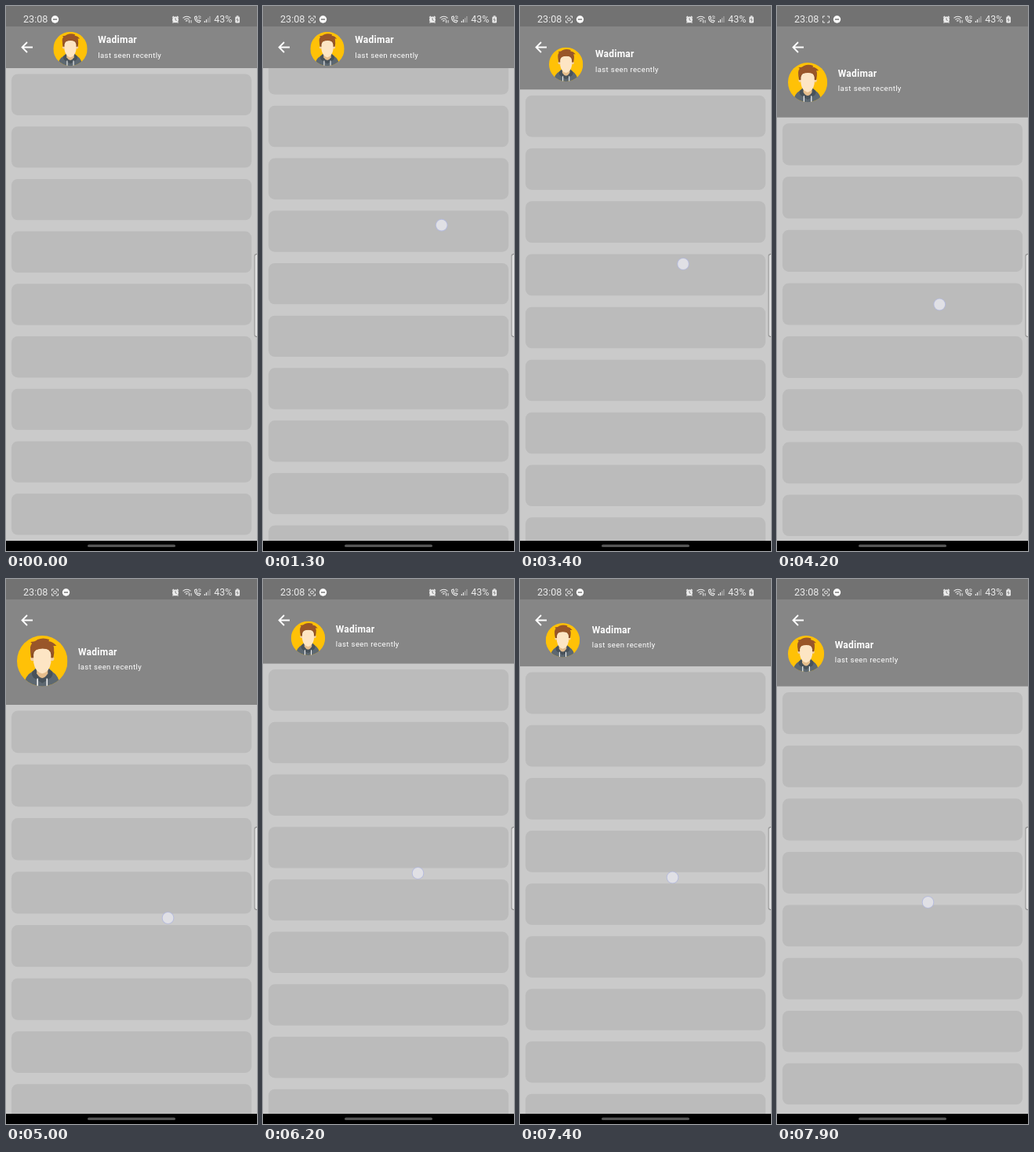
Animation of 320 by 693 pixels, one loop 8 s. Source, as an HTML page with a canvas:

```html
<!DOCTYPE html>
<html lang="en">
<head>
<meta charset="utf-8">
<title>Collapsing profile header</title>
<style>
html, body { margin: 0; width: 100%; height: 100%; overflow: hidden; background: #000; }
canvas { display: block; width: 320px; height: 693px; }
</style>
</head>
<body>
<canvas id="stage"></canvas>
<script>
const W = 320, H = 693, LOOP = 8000, STEP = 100;
const BAR = 79, EXPAND = 54, ROW = 66.7, ROW_H = 52.4, LIST_END = 680;
const FONT = 'Roboto, "Noto Sans", sans-serif';

const canvas = document.getElementById('stage');
const ratio = window.devicePixelRatio || 1;
canvas.width = W * ratio;
canvas.height = H * ratio;
const c = canvas.getContext('2d');
c.scale(ratio, ratio);

// time, finger x, finger y
const FINGER = [
  [1100, 228, 305], [1700, 227, 226], [2200, 225, 256], [3400, 208, 328],
  [5000, 206.5, 431], [5450, 205, 434], [5850, 204, 434],
  [6200, 197.5, 374], [6550, 197, 328], [6900, 196.5, 348], [7900, 192.5, 411]
];
// time, pull: below zero the list is scrolled, above zero the header grows
const PULL = [
  [1100, 0], [1700, -79], [2200, -48.7], [3400, 27.2], [3820, 54], [5000, 81],
  [5450, 82], [5850, 82], [6200, 28.6], [6550, -19], [6900, 0.8],
  [7750, 54], [7900, 57.5]
];
const STRETCH = [[2970, 0], [3400, 3], [5000, 8], [5850, 8], [6050, 0], [6900, 0], [7900, 5]];

function at(keys, t, col = 1) {
  if (t <= keys[0][0]) return keys[0][col];
  for (let i = 1; i < keys.length; i++) {
    const a = keys[i - 1], b = keys[i];
    if (t <= b[0]) return a[col] + (b[col] - a[col]) * (t - a[0]) / (b[0] - a[0]);
  }
  return keys[keys.length - 1][col];
}

function rect(x, y, w, h, color) {
  c.fillStyle = color;
  c.fillRect(x, y, w, h);
}

function pill(x, y, w, h, r, color) {
  c.beginPath();
  c.roundRect(x, y, w, h, r);
  c.fillStyle = color;
  c.fill();
}

function disc(x, y, r, color) {
  c.beginPath();
  c.arc(x, y, r, 0, Math.PI * 2);
  c.fillStyle = color;
  c.fill();
}

function line(path, width, color = '#fff') {
  c.strokeStyle = color;
  c.lineWidth = width;
  c.stroke(new Path2D(path));
}

function shape(path, color) {
  c.fillStyle = color;
  c.fill(new Path2D(path));
}

function label(text, x, y, font, spacing, color = '#fff') {
  c.font = font + ' ' + FONT;
  c.letterSpacing = spacing + 'px';
  c.fillStyle = color;
  c.fillText(text, x, y);
}

function drawList(pull, stretch) {
  rect(0, BAR, W, LIST_END - BAR, '#cacaca');
  const head = BAR + Math.max(pull, 0);
  const scroll = Math.max(-pull, 0);
  const bend = d => d + stretch * Math.sin(Math.PI / 2 * Math.max(0, Math.min(d / 520, 1)));
  c.save();
  c.beginPath();
  c.rect(0, head, W, LIST_END - head);
  c.clip();
  for (let i = 0; i < 12; i++) {
    const d = i * ROW - scroll;
    const top = bend(d);
    pill(7, head + 7.5 + top, 306, bend(d + ROW_H) - top, 8, '#bbbbbb');
  }
  c.restore();
}

// Drawn in a circle of radius 32
function drawAvatar(x, y, r) {
  c.save();
  c.translate(x, y);
  c.scale(r / 32, r / 32);
  c.beginPath();
  c.arc(0, 0, 32, 0, Math.PI * 2);
  c.clip();
  rect(-32, -32, 64, 64, '#ffc107');
  shape('M-24 34 Q-23 19 -12 13 L-8 9 H8 L12 13 Q22 19 23 34Z', '#5d6871');
  shape('M-12 13 Q-15 17 -11 21 L0 28 L11 21 Q15 17 12 13 L7 9 H-7Z', '#48525a');
  shape('M-7 8 H7 V16 Q0 27 -7 16Z', '#e5bd8c');
  disc(-12, -3, 3, '#f3cf9f');
  disc(12, -3, 3, '#f3cf9f');
  shape('M-14 -4 Q-17 -19 -10 -23 H11 Q17 -18 14 -4 L11 -4 H-11Z', '#8b4f25');
  shape('M-11 -8 Q-10 -16 0 -16 Q10 -16 11 -8 V2 Q9 14 0 16 Q-9 14 -11 2Z', '#fde5c4');
  shape('M-14 -9 Q-17 -18 -13 -22 L-15 -24 Q-9 -24 -6 -27 Q1 -30 9 -27 L8 -25'
    + ' Q14 -24 18 -19 L14 -19 Q16 -14 13 -8 L10 -14 Q0 -17 -8 -14Z', '#995629');
  line('M-6 22 V32 M6 22 V32', 1.6, '#f2f2f2');
  c.restore();
}

function drawHeader(pull, stretch) {
  const grow = Math.max(pull, 0);
  const p = Math.min(grow / EXPAND, 1);
  rect(0, 26, W, BAR - 26 + grow, '#868686');
  line('M34 52.5 H21 M27 46 L20.5 52.5 L27 59', 1.8);

  const r = (43.4 + 0.78 * Math.max(grow - EXPAND, 0)) / 2;
  const x = 60.3 - 46.3 * p + r;
  const y = 32.8 + 39.2 * p + r;
  drawAvatar(x, y, r);

  // The texts trail slightly while the header opens
  const lag = stretch > 0 ? 2 * Math.sin(Math.PI * p) : 0;
  const tx = x + r + 13.6 + lag, ty = y - lag * 0.8;
  label('Wadimar', tx, ty - 7.2, 'bold 12px', 0.25);
  label('last seen recently', tx, ty + 11, '9.5px', 0.4);
}

function drawStatus(t) {
  const ink = '#ececec', back = '#727272';
  rect(0, 0, W, 26, back);
  label('23:08', 22, 21.3, '12.6px', 0, ink);

  const capturing = t >= 200;
  if (capturing) {
    line('M58.5 15.5 V13 H61 M64 13 H66.5 V15.5 M66.5 18.5 V21 H64 M61 21 H58.5 V18.5', 1, ink);
    const phase = t % 900;
    const hidden = t < 600 || (t >= 1100 && phase >= 550 && phase < 700);
    if (!hidden) {
      c.beginPath();
      c.arc(62.5, 17, 1.9, 0, Math.PI * 2);
      c.strokeStyle = ink;
      c.lineWidth = 1;
      c.stroke();
    }
  }
  const dnd = capturing ? 76.5 : 62.5;
  disc(dnd, 17, 4.7, '#fff');
  rect(dnd - 2.7, 16.3, 5.4, 1.4, back);

  // alarm
  disc(216, 17.4, 3.9, ink);
  line('M212 14.6 L214 13 M218 13 L220 14.6 M213.4 20.4 L212.6 21.6 M218.6 20.4 L219.4 21.6', 1.2, ink);
  line('M216 15.2 V17.6 L217.6 18.6', 0.9, back);
  // wifi with transfer arrows
  line('M225.5 15.4 Q230.5 11 235.5 15.4 M227.3 17.4 Q230.5 14.6 233.5 17.2 M229 19.3 Q230.5 18 231.6 19', 1.1, ink);
  line('M233.5 21.5 V17.8 M236 18 V21.5', 1, ink);
  // call
  line('M240.5 14 Q240.5 20 246.5 21 L248 19 L245.8 17.8 L244.7 18.6 Q243 17.6 242.8 16 L243.6 15 L242.6 13Z', 1.1, ink);
  line('M245 13.3 Q246.5 12.2 248.5 13.6 M245.5 15.3 L248.5 15.3', 0.9, ink);
  // signal
  for (let i = 0; i < 4; i++) {
    rect(252.7 + i * 2.2, 19 - i * 2, 1.2, 2 + i * 2, i < 2 ? ink : '#a8a8a8');
  }
  label('43%', 265.3, 21.2, '12.4px', 0, ink);
  // battery
  pill(292.3, 13.4, 5.6, 8.2, 1.3, ink);
  rect(293.8, 12.4, 2.6, 1.2, ink);
  line('M295.5 15 L294 17.6 H296.2 L294.8 20', 0.8, back);
}

function drawFrame(t) {
  const pull = at(PULL, t), stretch = at(STRETCH, t);
  drawList(pull, stretch);
  drawHeader(pull, stretch);
  drawStatus(t);

  // edge handle
  pill(316.5, 315, 8, 106, 3, '#8f8f8f');
  pill(317.5, 316, 8, 104, 2.5, '#e2e2e2');

  if (t >= 1100) {
    const x = at(FINGER, t, 1), y = at(FINGER, t, 2);
    disc(x, y, 7.8, '#b4bade');
    disc(x, y, 6.9, '#e0e0e5');
  }

  rect(0, LIST_END, W, H - LIST_END, '#000');
  pill(104, 684.7, 112, 3.4, 1.7, '#555');
}

function tick() {
  const t = performance.now() % LOOP;
  drawFrame(Math.floor(t / STEP) * STEP);
  requestAnimationFrame(tick);
}
tick();
</script>
</body>
</html>
```
